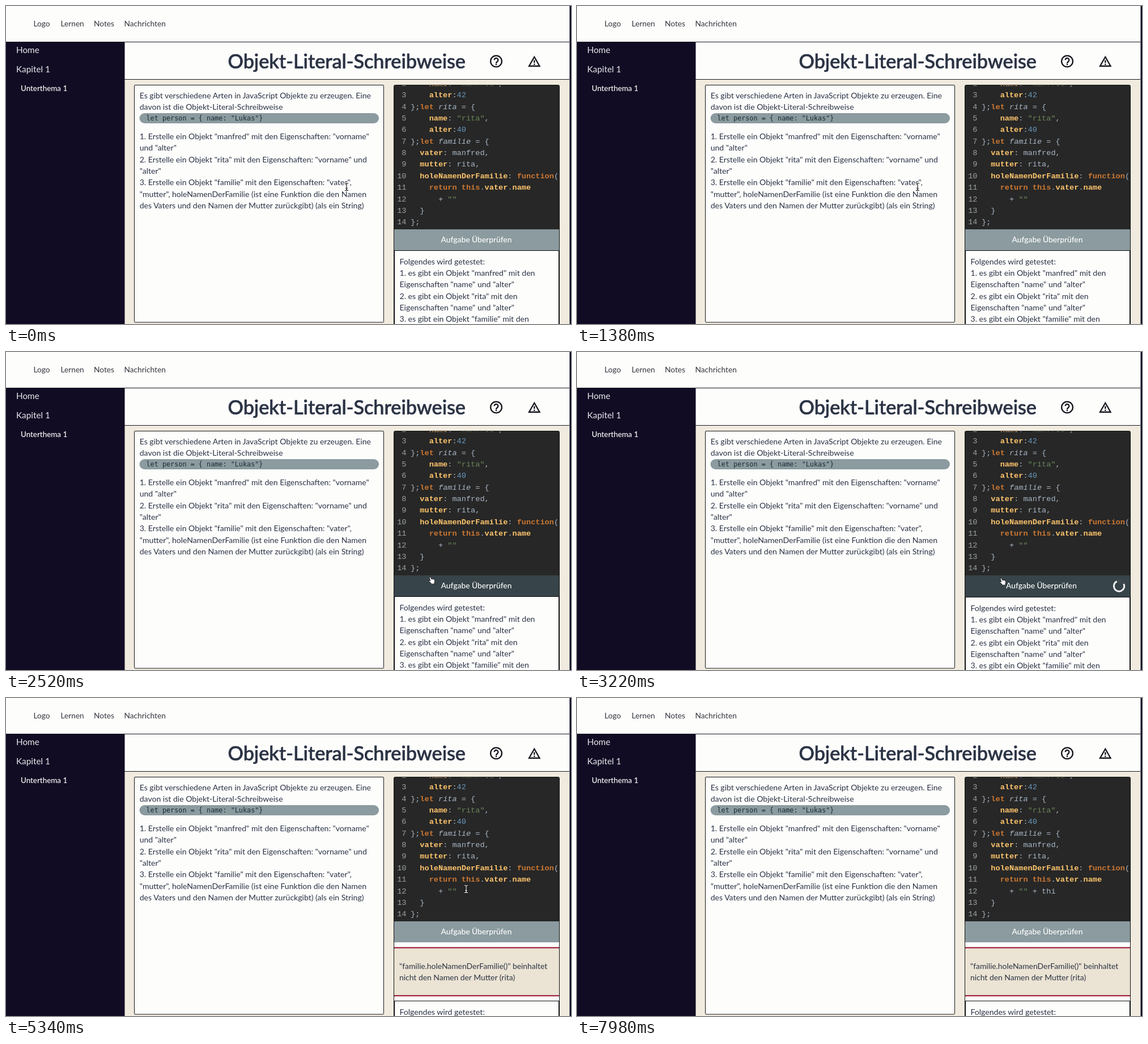
Write an HTML page that moves like this. It is 997 by 561 pixels and loops after 8000 ms.

```html
<!DOCTYPE html>
<html lang="de">
<head>
<meta charset="utf-8">
<style>
  html, body { margin: 0; width: 100%; height: 100%; overflow: hidden; background: #fdfdfd; }
  svg { display: block; width: 997px; height: 561px; }
  text { font-family: Lato, sans-serif; font-size: 14.05px; fill: #2b3344; white-space: pre; }
  .nav text { font-size: 13.7px; fill: #33363d; }
  .side text { font-size: 15.3px; fill: #e9e9ee; }
  .side .sub { font-size: 13.4px; font-weight: 500; fill: #fff; }
  .title { font-size: 34.2px; font-weight: 500; stroke: #2b3344; stroke-width: .7px; }
  .sample { font: 11.8px "DejaVu Sans Mono", monospace; fill: #1d2c36; }
  .code text { font: 13.6px "Liberation Mono", monospace; fill: #a9b7c6; }
  .code .no { fill: #9da2a5; text-anchor: end; }
  .key { fill: #cc7832; font-weight: bold; }
  .prop { fill: #ffc66d; font-weight: bold; }
  .str { fill: #6a8759; }
  .num { fill: #6897bb; }
  .def { font-style: italic; }
  #label { fill: #fff; font-size: 13.8px; font-weight: 500; text-anchor: middle; }
  .error text { font-size: 13.9px; }
</style>
</head>
<body>
<svg viewBox="0 0 997 561">
  <defs>
    <clipPath id="editor"><rect x="685" y="139.5" width="290.5" height="254.5"/></clipPath>
  </defs>
  <rect width="997" height="561" fill="#fdfdfc"/>
  <g class="nav">
    <text x="48.5" y="36">Logo</text>
    <text x="96.5" y="36">Lernen</text>
    <text x="155" y="36">Notes</text>
    <text x="208.5" y="36">Nachrichten</text>
  </g>

  <rect x="209" y="130" width="785" height="431" fill="#f0ebde"/>
  <path d="M0 63.5H994M209 129.5H994" stroke="#18181f"/>
  <rect y="64" width="209.5" height="497" fill="#110c23"/>
  <rect x="994.5" width="3" height="561" fill="#0c0d25"/>
  <g class="side">
    <text x="18" y="83">Home</text>
    <text x="18" y="117">Kapitel 1</text>
    <text class="sub" x="26" y="149.5">Unterthema 1</text>
  </g>

  <text class="title" x="391.5" y="109.5">Objekt-Literal-Schreibweise</text>
  <g fill="none" stroke="#15151c" stroke-width="2.3">
    <circle cx="865" cy="97.5" r="9.9"/>
    <path d="M861.7 95.3a3.3 3.3 0 1 1 5.6 2.4q-2.3 1.5-2.3 3.5M865 102v2.2"/>
    <path d="M932.3 89.8L941.5 106H923ZM932.3 95.5v4.7M932.3 101.8v2.2"/>
  </g>

  <rect x="226.5" y="139.5" width="440" height="418.5" rx="1.5" fill="#fdfdfc" stroke="#15151a"/>
  <g id="task"></g>
  <rect x="235.5" y="189" width="422.5" height="18" rx="9" fill="#8b9b9f"/>
  <text class="sample" x="247.5" y="201.5">let person = { name: "Lukas"}</text>

  <rect x="685" y="140" width="291" height="421" fill="#fdfdfc"/>
  <rect x="685" y="140" width="291" height="254" fill="#272727"/>
  <g class="code" id="code" clip-path="url(#editor)"></g>
  <rect id="caret" y="331.5" width="1.2" height="17" fill="#d0d4d8"/>

  <g class="error" id="error">
    <rect x="685" y="440.5" width="291" height="85" fill="#ebe3d3"/>
    <path d="M685 440.5h291M685 525.3h291" stroke="#970f31" stroke-width="2"/>
    <text x="694" y="477.5">"familie.holeNamenDerFamilie()" beinhaltet</text>
    <text x="694" y="497.5">nicht den Namen der Mutter (rita)</text>
  </g>
  <g id="tests">
    <rect x="685.5" y="431.5" width="290" height="200" fill="#fdfdfc" stroke="#101014"/>
  </g>
  <rect id="button" x="685" y="394" width="291"/>
  <rect x="684.5" y="139.5" width="292" height="440" rx="2" fill="none" stroke="#101014"/>
  <text id="label" y="417">Aufgabe Überprüfen</text>
  <g id="spinner" fill="none" stroke-width="3">
    <circle r="9.2" stroke="#f4f4f4"/>
    <path d="M-6.5 -6.5A9.2 9.2 0 0 1 6.5 -6.5" stroke="#30373b"/>
  </g>

  <g id="beam" fill="none" stroke-linecap="round">
    <path id="beamEdge" d="M-2.8-6.5Q0-6.5 0-4.5Q0-6.5 2.8-6.5M0-4.5V4.5M-2.8 6.5Q0 6.5 0 4.5Q0 6.5 2.8 6.5M-1.5 2.5h3" stroke-width="2.8"/>
    <path id="beamCore" d="M-2.8-6.5Q0-6.5 0-4.5Q0-6.5 2.8-6.5M0-4.5V4.5M-2.8 6.5Q0 6.5 0 4.5Q0 6.5 2.8 6.5M-1.5 2.5h3" stroke-width="1.1"/>
  </g>
  <path id="hand" d="M-3.5-5.5q1.2-1 2 .4l1.5 3q.8-1 1.8-.1q1-.8 1.8.2q1.4-.4 1.8 1.1q.6 2.3-.4 5.1v2h-5.5l-1-2l-3.3-2.8q-.7-1.6 1-1.5l1.6.8l-1.6-4.6q-.3-1 .3-1.6Z" fill="#fff" stroke="#111" stroke-width=".9"/>
</svg>
<script>
const LOOP = 8000, LINE = 20.36, CHAR = 13.6 * 0.6;
const CODE_X = 714, CODE_Y = 161.3;
const el = id => document.getElementById(id);
const clamp = v => Math.max(0, Math.min(1, v));
const show = (node, on) => node.style.display = on ? '' : 'none';

function addText(parent, x, y, markup, cls = '') {
  parent.insertAdjacentHTML('beforeend', `<text x="${x}" y="${y}" class="${cls}">${markup}</text>`);
  return parent.lastElementChild;
}
const addLines = (parent, x, y, lines) =>
  lines.forEach((line, i) => addText(parent, x, y + i * LINE, line));

addLines(el('task'), 235.7, 163, [
  'Es gibt verschiedene Arten in JavaScript Objekte zu erzeugen. Eine',
  'davon ist die Objekt-Literal-Schreibweise'
]);
addLines(el('task'), 235.7, 235, [
  '1. Erstelle ein Objekt "manfred" mit den Eigenschaften: "vorname"',
  'und "alter"',
  '2. Erstelle ein Objekt "rita" mit den Eigenschaften: "vorname" und',
  '"alter"',
  '3. Erstelle ein Objekt "familie" mit den Eigenschaften: "vater",',
  '"mutter", holeNamenDerFamilie (ist eine Funktion die den Namen',
  'des Vaters und den Namen der Mutter zurückgibt) (als ein String)'
]);
addLines(el('tests'), 694.5, 455.5, [
  'Folgendes wird getestet:',
  '1. es gibt ein Objekt "manfred" mit den',
  'Eigenschaften "name" und "alter"',
  '2. es gibt ein Objekt "rita" mit den',
  'Eigenschaften "name" und "alter"',
  '3. es gibt ein Objekt "familie" mit den'
]);

const token = cls => s => `<tspan class="${cls}">${s}</tspan>`;
const [key, prop, str, num, def] = ['key', 'prop', 'str', 'num', 'def'].map(token);
const editLine = `      + ${str('""')}`;
const codeLines = [
  `    ${prop('name')}: ${str('"manfred"')},`,
  `    ${prop('alter')}:${num(42)}`,
  `};${key('let')} ${def('rita')} = {`,
  `    ${prop('name')}: ${str('"rita"')},`,
  `    ${prop('alter')}:${num(40)}`,
  `};${key('let')} ${def('familie')} = {`,
  `  ${prop('vater')}: manfred,`,
  `  ${prop('mutter')}: rita,`,
  `  ${prop('holeNamenDerFamilie')}: ${key('function')}(`,
  `    ${key('return')} ${key('this')}.${prop('vater')}.${prop('name')}`,
  editLine,
  '  }',
  '};'
];
const codeNodes = codeLines.map((line, i) => {
  const y = CODE_Y + (i - 1) * LINE;
  addText(el('code'), 706.5, y, i + 2, 'no');
  return addText(el('code'), CODE_X, y, line);
});
const editNode = codeNodes[codeLines.indexOf(editLine)];

// Pointer stops: time, x, y
const stops = [
  [0, 601, 319], [1600, 601, 319], [2300, 751, 403], [3000, 751, 403],
  [3100, 751, 405], [3500, 751, 405], [4000, 790, 366], [4300, 790, 366],
  [4900, 812, 337], [LOOP, 812, 337]
];
function pointerAt(t) {
  const i = stops.findIndex(s => s[0] > t);
  const [t0, x0, y0] = stops[i - 1], [t1, x1, y1] = stops[i];
  const u = (t - t0) / (t1 - t0), e = u * u * (3 - 2 * u);
  return [x0 + (x1 - x0) * e, y0 + (y1 - y0) * e];
}

const typed = ' + thi', keyTimes = [6500, 6750, 7000, 7550, 7700, 7850];
const LOAD = 3040, RESULT = 3450, FOCUS = 5600;
const mix = (a, b, k) => `rgb(${a.map((v, i) => Math.round(v + (b[i] - v) * k))})`;
let lastCount = -1;

function render(t) {
  const loading = t >= LOAD && t < RESULT, failed = t >= RESULT;
  const hover = clamp((t - 2150) / 150) - clamp((t - 3660) / 150);
  el('button').setAttribute('height', loading ? 38 : 37);
  el('button').setAttribute('fill', mix([139, 155, 159], [55, 68, 73], hover));
  el('label').setAttribute('x', loading ? 819.5 : 830);
  el('tests').setAttribute('transform', `translate(0 ${failed ? 103 : loading ? 1 : 0})`);
  show(el('error'), failed);
  show(el('spinner'), loading);
  el('spinner').setAttribute('transform', `translate(956.5 413) rotate(${(t - 3220) * 0.36 + 20})`);

  const count = keyTimes.filter(k => k <= t).length;
  if (count !== lastCount) editNode.innerHTML = editLine + typed.slice(0, count);
  lastCount = count;
  el('caret').setAttribute('x', CODE_X + (10 + count) * CHAR);
  show(el('caret'), t >= FOCUS && t < 7900 && (count > 0 || (t - FOCUS) % 1000 < 500));

  const [x, y] = pointerAt(t), dark = x > 685, overButton = dark && y > 394;
  show(el('hand'), overButton);
  show(el('beam'), !overButton && count === 0);
  for (const id of ['hand', 'beam']) el(id).setAttribute('transform', `translate(${x} ${y})`);
  el('beamEdge').setAttribute('stroke', dark ? '#111' : '#fff');
  el('beamCore').setAttribute('stroke', dark ? '#fff' : '#111');
}

function tick() {
  render(performance.now() % LOOP);
  requestAnimationFrame(tick);
}
tick();
</script>
</body>
</html>
```
